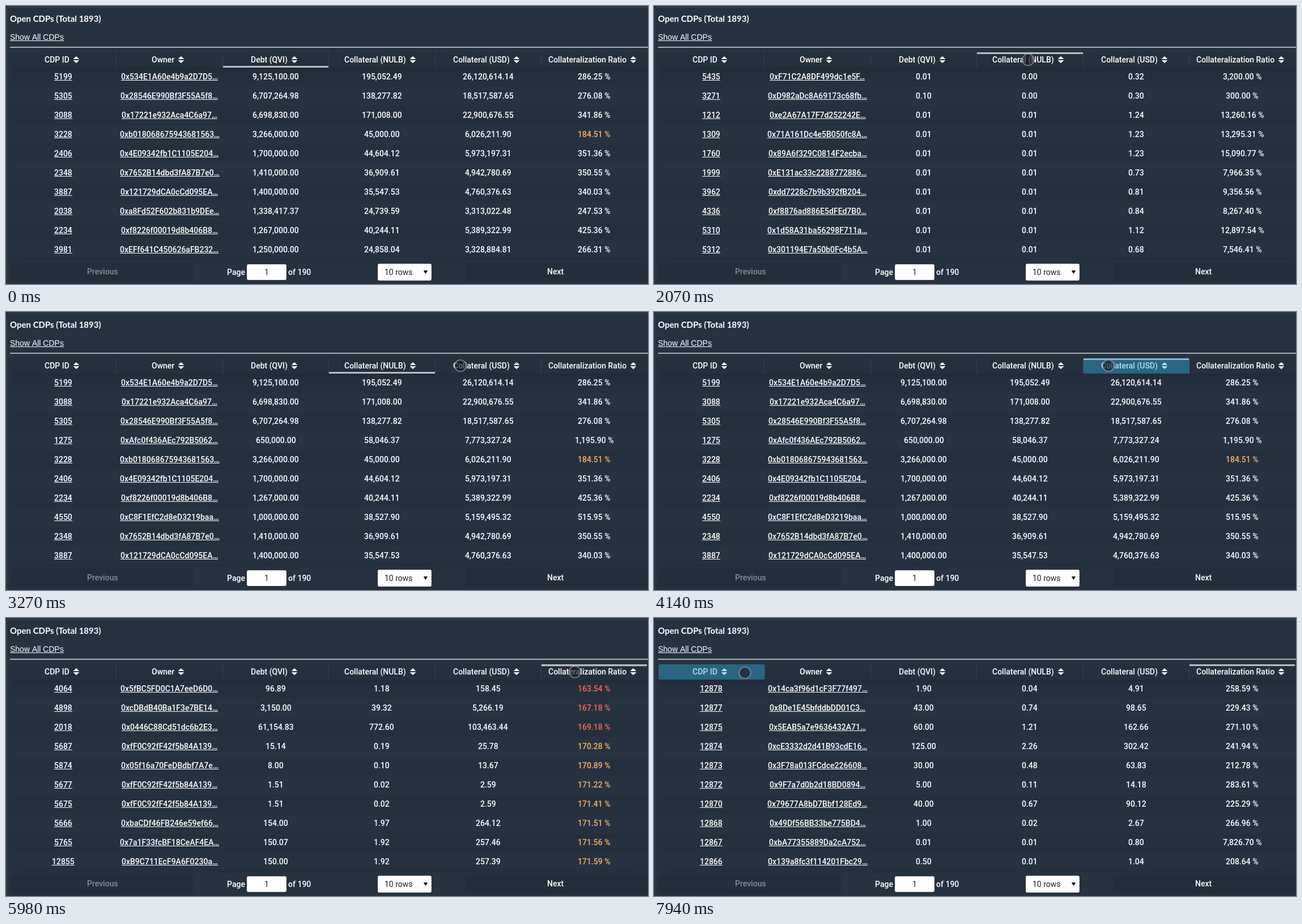
Recreate the animation shown at these times as an HTML page with a canvas. Size 1133 px wide and 492 px high, loop 8 s.

```html
<!DOCTYPE html>
<html lang="en">
<head>
<meta charset="utf-8">
<title>Open CDPs</title>
<style>
  html, body { margin: 0; width: 100%; height: 100%; overflow: hidden; background: #263240; }
  canvas { display: block; }
</style>
</head>
<body>
<canvas id="stage" width="1133" height="492"></canvas>
<script>
const ctx = document.getElementById('stage').getContext('2d');
const LOOP = 8000, LEFT = 8, COL = 187.4, HEAD = 82, HEAD_H = 27, ROW_H = 34, PRICE = 133.91582;
const PLAIN = '14px Roboto, sans-serif', MEDIUM = '500 ' + PLAIN;
const headers = ['CDP ID', 'Owner', 'Debt (QVI)', 'Collateral (NULB)', 'Collateral (USD)', 'Collateralization Ratio'];

const clamp = v => Math.max(0, Math.min(1, v));
const money = v => v.toLocaleString('en-US', { minimumFractionDigits: 2, maximumFractionDigits: 2 });

function seeded(seed) {
  let s = seed * 7919;
  return () => (s = (s * 1103515245 % 2147483648 + 12345) % 2147483648) / 2147483648;
}

// Hex address, cut with an ellipsis where the cell ends
function ownerOf(seed) {
  const rand = seeded(seed), hex = '0123456789abcdef0123456789ABCDEF';
  let text = '0x';
  ctx.font = MEDIUM;
  for (;;) {
    const next = text + hex[Math.floor(rand() * 32)];
    if (ctx.measureText(next + '…').width > 176.5) return text + '…';
    text = next;
  }
}

function makeRow(id, debt, coll, usd = coll * PRICE, owner = id) {
  return [id, ownerOf(owner), debt, coll, usd, usd / debt * 100];
}

const byRatio = (id, debt, ratio, owner) =>
  makeRow(id, debt, Math.max(.01, debt * ratio / PRICE), debt * ratio, owner);

// Dust positions: about a cent of debt and a dollar of collateral
function dustRow(id) {
  const rand = seeded(id);
  rand();
  return makeRow(id, .007 + .004 * rand(), .01, .65 + .7 * rand());
}

// id:debt:collateral
const large = `5199:9125100:195052.49 5305:6707264.98:138277.82 3088:6698830:171008 3228:3266000:45000
  2406:1700000:44604.12 2348:1410000:36909.61 3887:1400000:35547.53 2038:1338417.37:24739.59
  2234:1267000:40244.11 3981:1250000:24858.04 1275:650000:58046.37 4550:1000000:38527.90`
  .split(/\s+/).map(entry => makeRow(...entry.split(':').map(Number)));

const dust = [1212, 1309, 1760, 1999, 3962, 4336, 5310, 5312].map(dustRow);
const empty = [makeRow(5435, .01, 0, .32), makeRow(3271, .1, 0, .3)];

// Ratios climb towards 171.6 %; a repeated debt belongs to the same owner
const risky = '4064:96.89 4898:3150 2018:61154.83 5687:15.14 5874:8 5677:1.51 5675:1.51 5666:154 5765:150.07 12855:150'
  .split(' ').map((entry, i) => {
    const [id, debt] = entry.split(':').map(Number);
    return byRatio(id, debt, 1.7163 - .0809 * .55 ** i, debt === 1.51 ? 5687 : id);
  });

const recent = [1.9, 43, 60, 125, 30, 5, 40, 1, 0, .5].map((debt, i) => {
  const id = 12878 - i - (i > 1) - (i > 5) - (i > 6);
  return debt ? byRatio(id, debt, 2.03 + seeded(id)()) : dustRow(id);
});

const rows = [...large, ...empty, ...dust, ...risky, ...recent];

// Header taps: time, column, direction (1 ascending, -1 descending)
const taps = [[-9999, 2, -1], [1440, 3, 1], [2140, 3, -1], [3590, 4, 1], [4140, 4, -1], [5740, 5, 1], [7940, 0, -1]]
  .map(([at, col, dir]) => ({
    at, col, dir,
    view: [...rows].sort((a, b) => dir * (a[col] - b[col])).slice(0, 10)
  }));

// Cursor moves: start, end, goal x, goal y, sag of the arc
const moves = [
  [610, 1180, 661, 89, 0], [1370, 1440, 660.5, 95, 0], [2700, 3270, 802, 95, -4], [4330, 5110, 973.5, 92, -6],
  [5160, 5350, 1004, 95.5, 0], [6430, 7190, 359, 90, 10], [7260, 7900, 160.5, 97, 0]
];

// cubic-bezier(.175, .885, .32, 1.275)
function easeBack(x) {
  if (x <= 0 || x >= 1) return clamp(x);
  const bez = (a, b, s) => 3 * a * s * (1 - s) ** 2 + 3 * b * s * s * (1 - s) + s ** 3;
  let lo = 0, hi = 1;
  for (let i = 0; i < 20; i++) {
    const mid = (lo + hi) / 2;
    if (bez(.175, .32, mid) < x) lo = mid; else hi = mid;
  }
  return bez(.885, 1.275, lo);
}

function rect(x, y, w, h, color, radius = 0) {
  ctx.fillStyle = color;
  ctx.beginPath();
  ctx.roundRect(x, y, w, h, radius);
  ctx.fill();
}

function text(str, x, y, { color = '#fff', font = MEDIUM, align = 'left', underline = false } = {}) {
  ctx.font = font;
  ctx.fillStyle = color;
  const width = ctx.measureText(str).width;
  const left = Math.round(align === 'center' ? x - width / 2 : x);
  ctx.fillText(str, left, y);
  if (underline) ctx.fillRect(left, y + 1, Math.round(width), 1);
  return left + width;
}

function triangle(x, y, w, h, color) {
  ctx.fillStyle = ctx.strokeStyle = color;
  ctx.lineWidth = 1;
  ctx.lineJoin = 'round';
  ctx.beginPath();
  ctx.moveTo(x, y);
  ctx.lineTo(x + w, y);
  ctx.lineTo(x + w / 2, y + h);
  ctx.closePath();
  ctx.fill();
  ctx.stroke();
}

function drawFrame() {
  rect(0, 0, 1133, 492, '#212b37');
  rect(1, 1, 1150, 510, '#36424f', 5);
  rect(2, 2.5, 1150, 510, '#263240', 4);
  text('Open CDPs (Total 1893)', 7, 28, { font: 'bold 15px Lato, sans-serif' });
  text('Show All CDPs', 7, 60, { font: '14px "Liberation Sans", Arial, sans-serif', underline: true });
  rect(7, 72, 1126, 2, '#a9afb2');
}

// Bar with a soft shadow, kept inside the table
function shadowBar(y, h, color, alpha, dy) {
  ctx.save();
  ctx.beginPath();
  ctx.rect(LEFT, HEAD, 1125, 410);
  ctx.clip();
  ctx.shadowColor = `rgba(0, 0, 0, ${alpha})`;
  ctx.shadowBlur = 15;
  ctx.shadowOffsetY = dy;
  rect(LEFT, y, 1125, h, color);
  ctx.restore();
}

function drawHeader(t) {
  shadowBar(HEAD, HEAD_H, '#25303d', .15, 2);
  headers.forEach((label, i) => {
    const x = Math.round(LEFT + i * COL), right = Math.round(LEFT + (i + 1) * COL) - 1;
    if (i < 5) rect(right, HEAD, 1, HEAD_H, '#35404d');
    ctx.font = MEDIUM;
    const start = 98 + i * COL - (ctx.measureText(label).width + 17) / 2;
    const end = Math.round(text(label, start, 100) + 7);
    triangle(end + .5, 93.5, 9, -4, '#fff');
    triangle(end + .5, 96.5, 9, 4, '#fff');

    // The sort mark slides between the top and the bottom edge
    let offset = 0, strength = 0;
    for (const tap of taps) {
      const k = easeBack((t - tap.at - 70) / 300), active = tap.col === i;
      offset += ((active ? 3 * tap.dir : 0) - offset) * k;
      strength += (active - strength) * clamp(k);
    }
    const y = offset > 0 ? HEAD : HEAD + HEAD_H + offset;
    rect(x, y, right - x, Math.abs(offset), `rgba(188, 191, 193, ${strength})`);
  });
}

function drawRows(view) {
  view.forEach((row, r) => {
    const top = 108 + r * ROW_H;
    if (r % 2 === 0) rect(LEFT, top + 1, 1125, ROW_H, 'rgba(0, 0, 0, .04)');
    row.forEach((value, c) => {
      const isRatio = c === 5;
      const color = !isRatio || value >= 200 ? '#fff' : value < 170 ? '#ff6554' : '#fbb069';
      const label = c < 2 ? String(value) : money(value) + (isRatio ? ' %' : '');
      text(label, 101.1 + c * COL, top + 22, { color, align: 'center', underline: c < 2 });
    });
  });
}

function field(x, y, w, h) {
  rect(x, y, w, h, '#e3e5e7', 3);
  rect(x + 1, y + 1, w - 2, h - 2, '#fff', 2);
}

function drawFooter() {
  shadowBar(450, 42, '#263240', .1, 0);
  for (const x of [8, 810]) rect(x, 453, 323, 36, '#242e3a', 3);
  text('Previous', 170.5, 475, { color: '#858c93', align: 'center' });
  text('Next', 969.5, 475, { align: 'center' });
  text('Page', 389.5, 476);
  field(425, 457, 70, 28);
  text('1', 460, 476, { color: '#222', font: PLAIN, align: 'center' });
  text('of 190', 498, 476);
  field(656, 456, 95, 30);
  text('10 rows', 668, 476, { color: '#222', font: PLAIN });
  triangle(737.5, 468.5, 6, 5, '#111');
}

function drawHighlight(t, tap) {
  const alpha = .4 * clamp(1 - (t - tap.at - 70) / 170);
  if (alpha) rect(LEFT + tap.col * COL, HEAD, COL, HEAD_H, `rgba(51, 181, 229, ${alpha})`, 3);
}

function drawCursor(t) {
  if (t < moves[0][0]) return;
  let x = 970, y = 449;
  for (const [start, end, goalX, goalY, sag] of moves) {
    const k = clamp((t - start) / (end - start));
    x += (goalX - x) * k;
    y += (goalY - y) * k + sag * Math.sin(Math.PI * k);
  }
  ctx.beginPath();
  ctx.arc(x, y, 10.2, 0, 7);
  ctx.fillStyle = 'rgba(22, 24, 32, .62)';
  ctx.fill();
  ctx.lineWidth = 1.8;
  ctx.strokeStyle = 'rgba(150, 156, 162, .75)';
  ctx.stroke();
}

function draw(now) {
  const t = now % LOOP;
  const tap = taps.findLast(p => p.at <= t);
  drawFrame();
  drawHeader(t);
  drawRows(tap.view);
  drawFooter();
  drawHighlight(t, tap);
  drawCursor(t);
  requestAnimationFrame(draw);
}
requestAnimationFrame(draw);
</script>
</body>
</html>
```
